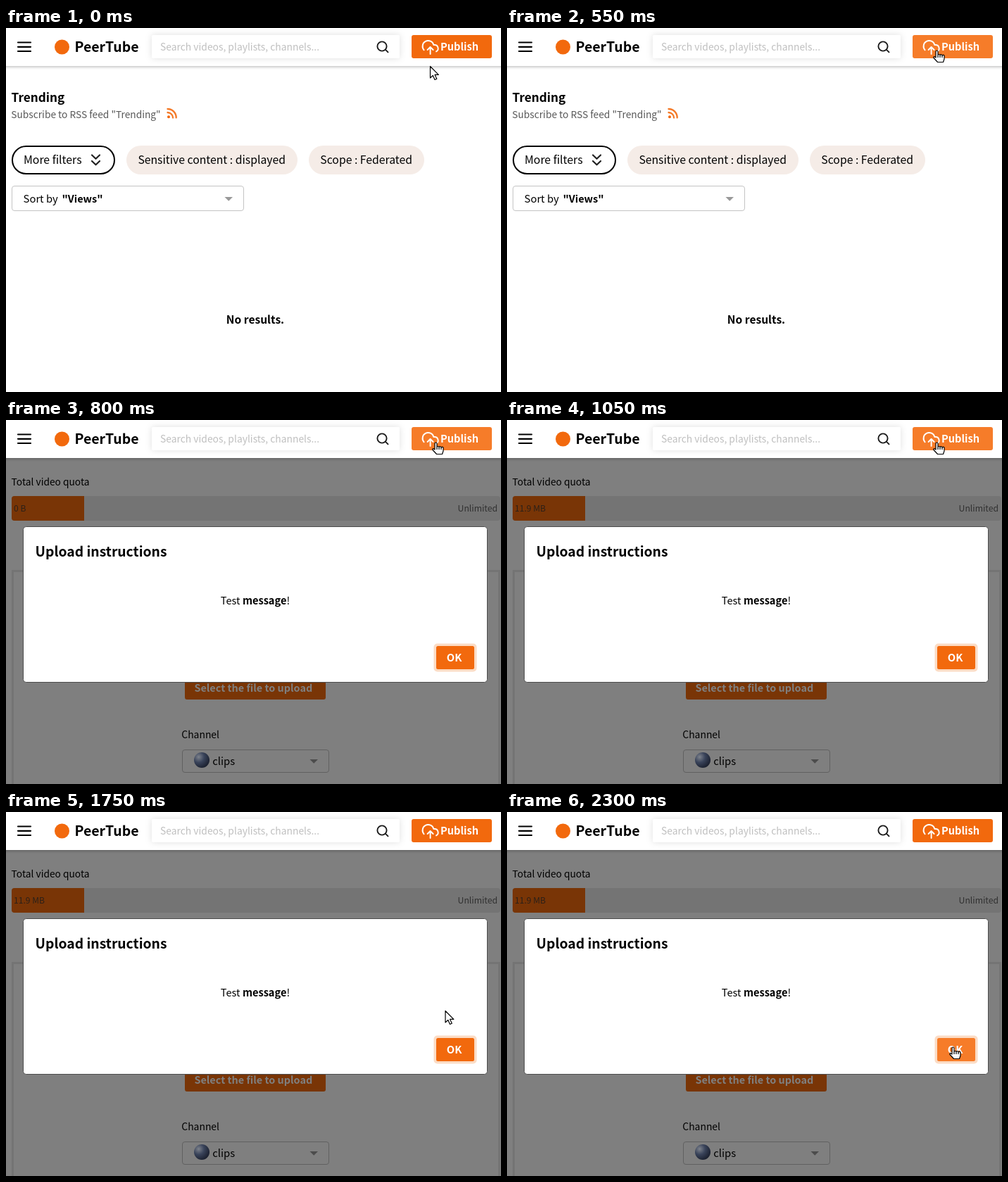
An HTML page that plays this animation: 703 by 517 pixels, repeating every 2.35 s.

```html
<!DOCTYPE html>
<html lang="en">
<head>
<meta charset="utf-8">
<title>Upload instructions</title>
<style>
  html, body { margin: 0; width: 100%; height: 100%; overflow: hidden; background: #fff; }
  svg { display: block; }
  text { font: 14px "Noto Sans CJK JP", "Noto Sans CJK SC", "Noto Sans CJK KR", "Noto Sans", sans-serif; white-space: pre; }
  .b { font-weight: 700; }
  .line { fill: none; stroke-linecap: round; stroke-linejoin: round; }
  .pill { fill: #f5ece7; }
  .ring { fill: #fbdcc5; }
  .orange { fill: #f2690d; }
  .orange.hover { fill: #f67c29; }
  .dimOrange { fill: #793506; }
</style>
</head>
<body>
<svg width="703" height="517" viewBox="0 0 703 517">
  <defs>
    <radialGradient id="photo" cx=".3" cy=".3" r=".8">
      <stop offset="0" stop-color="#7d828b"/>
      <stop offset=".45" stop-color="#39435a"/>
      <stop offset="1" stop-color="#171c2a"/>
    </radialGradient>
  </defs>

  <g id="list">
    <text class="b" x="7.5" y="105" style="font-size:17.2px">Trending</text>
    <text x="7.3" y="128" fill="#585858" style="font-size:13.75px">Subscribe to RSS feed "Trending"</text>
    <circle class="orange" cx="231" cy="126.2" r="2"/>
    <path class="line" d="M229.5 120a7.6 7.6 0 0 1 7.6 7.6M229.5 115a12.2 12.2 0 0 1 12.2 12.4" stroke="#f47a28" stroke-width="2.3"/>

    <rect x="9" y="168" width="145" height="39" rx="19.5" fill="none" stroke="#000" stroke-width="2"/>
    <text x="25" y="193" style="font-size:15.8px">More filters</text>
    <path class="line" d="M122 180.5l5.5 5.3 5.5-5.3M122 189l5.5 5.3 5.5-5.3" stroke="#222" stroke-width="2.2"/>
    <rect class="pill" x="171" y="167" width="243" height="41" rx="20.5"/>
    <text x="187.4" y="193" style="font-size:15.75px">Sensitive content : displayed</text>
    <rect class="pill" x="430" y="167" width="164" height="41" rx="20.5"/>
    <text x="446.3" y="193" style="font-size:15.75px">Scope : Federated</text>

    <rect x="8.5" y="224.5" width="329" height="35" rx="3.5" fill="#fff" stroke="#c4c4c4"/>
    <text x="24.6" y="248" style="font-size:14.8px">Sort by</text>
    <text class="b" x="79.5" y="248" style="font-size:14.5px">"Views"</text>
    <path d="M310.500 240h11.500l-5.750 5.700z" fill="#999"/>
    <text class="b" x="354" y="420" text-anchor="middle" style="font-size:15.6px">No results.</text>
  </g>

  <g id="upload">
    <rect width="703" height="517" fill="#7f7f7f"/>
    <text x="7.6" y="93" style="font-size:13.75px">Total video quota</text>
    <rect x="8" y="108" width="694" height="35" rx="4" fill="#747474"/>
    <path class="dimOrange" d="M111 108v35H12q-4 0-4-4v-27q0-4 4-4z"/>
    <text id="quota" x="11" y="130" fill="#2b2019" style="font-size:12.1px"></text>
    <text x="698" y="130" text-anchor="end" fill="#303030" style="font-size:12.2px">Unlimited</text>
    <rect x="9.500" y="214.500" width="691" height="320" fill="none" stroke="#747474" stroke-width="3"/>
    <rect class="dimOrange" x="254" y="364" width="200" height="33" rx="3"/>
    <text class="b" x="267.4" y="386" fill="#7f7f7f" style="font-size:14.45px">Select the file to upload</text>
    <text x="249.300" y="452" style="font-size:13.9px">Channel</text>
    <rect x="250.5" y="468.5" width="208" height="32" rx="3.5" fill="none" stroke="#616161"/>
    <circle cx="278" cy="483" r="11" fill="url(#photo)"/>
    <text x="293.2" y="490" style="font-size:14.8px">clips</text>
    <path d="M431.500 482h11.500l-5.750 5.700z" fill="#4c4c4c"/>

    <rect x="24.5" y="151.5" width="659" height="221" rx="4" fill="#fff" stroke="#4c4c4c"/>
    <text class="b" x="41.600" y="194" style="font-size:19.3px">Upload instructions</text>
    <text x="354" y="262" text-anchor="middle" style="font-size:14.6px">Test <tspan class="b">message</tspan>!</text>
    <rect class="ring" x="607.5" y="317.500" width="61" height="40" rx="5"/>
    <rect id="ok" class="orange" x="611" y="321" width="54" height="33" rx="2.5"/>
    <text class="b" x="636.6" y="343" text-anchor="middle" fill="#fff" style="font-size:14.8px">OK</text>
  </g>

  <g id="header">
    <rect x="-10" y="-10" width="723" height="64" fill="#fff" style="filter:drop-shadow(0 1px 2px rgba(0,0,0,.3))"/>
    <path d="M17 20.500h18M17 26.800h18M17 33h18" class="line" stroke="#000" stroke-width="2.2"/>
    <circle class="orange" cx="79.500" cy="27" r="10.500"/>
    <text class="b" x="97.4" y="34" style="font-size:19.5px">PeerTube</text>
    <rect x="207" y="10" width="352" height="33" rx="2" fill="#fff" style="filter:drop-shadow(0 0 5px rgba(0,0,0,.13))"/>
    <text x="219" y="32" fill="#bfbfbf" style="font-size:13.85px">Search videos, playlists, channels...</text>
    <path class="line" d="M540.6 26a6.600 6.600 0 1 1-13.200 0a6.600 6.600 0 1 1 13.200 0M538.800 30.700l3.700 3.700" stroke="#1a1a1a" stroke-width="1.9"/>
    <rect id="focus" class="ring" x="572.5" y="6.500" width="121" height="40" rx="5"/>
    <rect id="publish" class="orange" x="576" y="10" width="114" height="33" rx="3"/>
    <path class="line" transform="translate(590.600 15)" d="M8 16l4-4 4 4M12 12v10M20.400 18.400A5 5 0 0 0 18 9h-1.260A8 8 0 1 0 3 16.300" stroke="#fff" stroke-width="1.9"/>
    <text class="b" x="617" y="32" fill="#fff" style="font-size:14.6px">Publish</text>
  </g>

  <g id="cursor" fill="#fff" stroke="#000" stroke-width="1.2" stroke-linejoin="round">
    <path id="arrow" d="M0 0v16.500l3.800-3.600 2.700 6.100 2.800-1.200-2.700-5.900h5.200z"/>
    <path id="hand" d="M-1.500 1.500a1.500 1.500 0 0 1 3 0V7a1.500 1.500 0 0 1 3 0a1.500 1.500 0 0 1 3 .5a1.500 1.500 0 0 1 3 .8V12l-1.500 4.500h-8L-4.500 10.500q-.500-2 1-1.800L-1.500 10zM1.500 7v3M4.500 7v3M7.500 7.500V10"/>
  </g>
</svg>
<script>
const LOOP = 2350, STEP = 50, OPEN = 800;
const $ = id => document.getElementById(id);
const show = (id, on) => $(id).style.display = on ? '' : 'none';

// Pointer path: time, x, y
const path = [
  [0, 602.5, 54.5], [350, 607, 41.5], [550, 610.5, 32], [1050, 610.5, 32],
  [1150, 610, 55], [1300, 608.5, 115.5], [1750, 624, 282.5],
  [1950, 631.5, 327], [2100, 633.5, 334], [LOOP, 633.5, 334]
];

function pointerAt(t) {
  const i = path.findIndex(p => p[0] > t);
  const [t0, x0, y0] = path[i - 1], [t1, x1, y1] = path[i];
  const k = (t - t0) / (t1 - t0);
  return [x0 + (x1 - x0) * k, y0 + (y1 - y0) * k];
}

function draw(t) {
  const [x, y] = pointerAt(t);
  const overPublish = y < 41;
  const overOk = t > OPEN && y > 321;
  show('list', t < OPEN);
  show('upload', t >= OPEN);
  show('focus', t >= 650 && t < OPEN);
  $('quota').textContent = t < 950 ? '0 B' : '11.9 MB';
  $('publish').classList.toggle('hover', overPublish);
  $('ok').classList.toggle('hover', overOk);
  show('hand', overPublish || overOk);
  show('arrow', !overPublish && !overOk);
  $('cursor').setAttribute('transform', `translate(${x} ${y})`);
}

const start = performance.now();
function tick() {
  const t = (performance.now() - start) % LOOP;
  draw(Math.floor(t / STEP) * STEP);
  requestAnimationFrame(tick);
}
tick();
</script>
</body>
</html>
```
